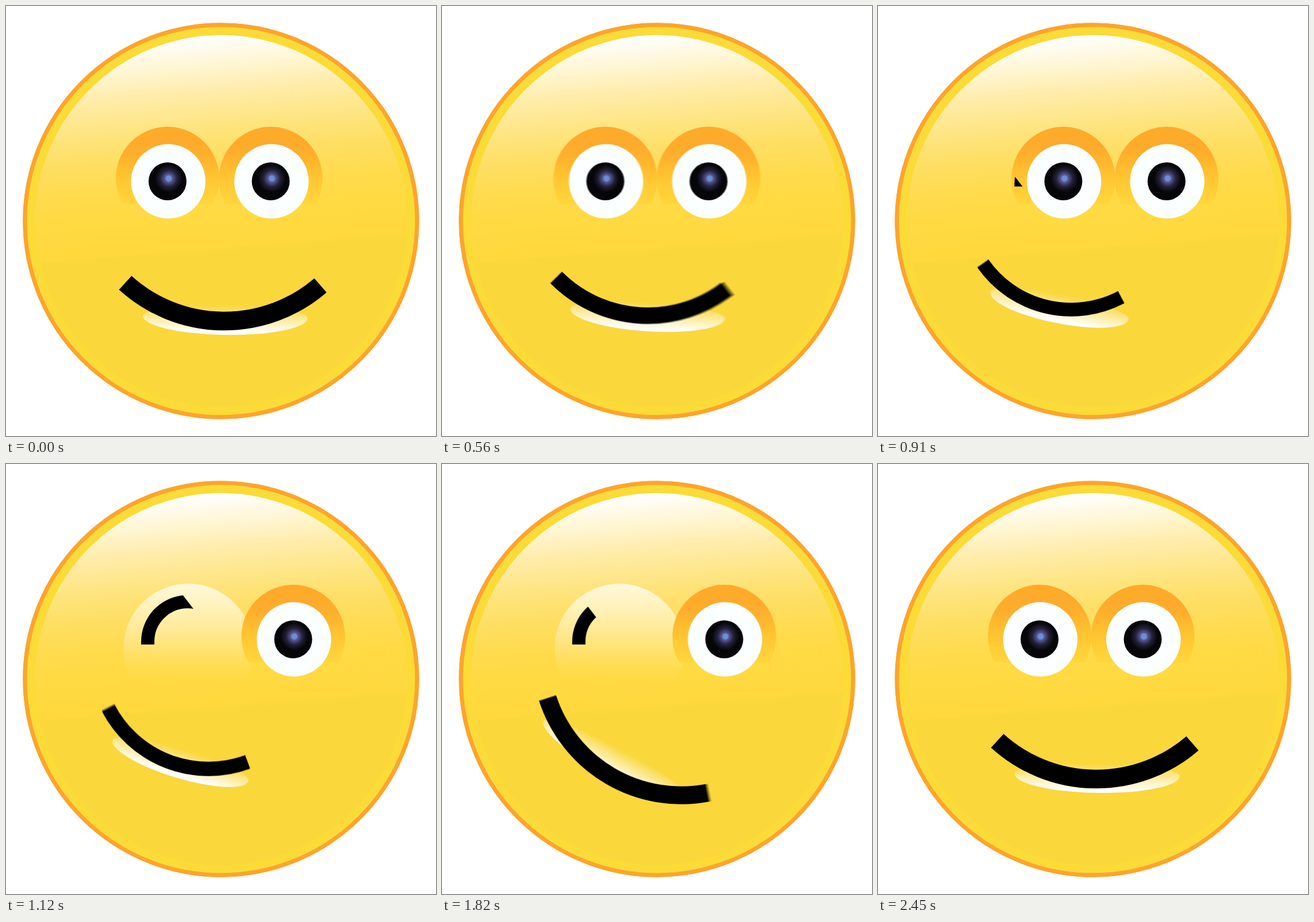
Write an HTML page that moves like this. It is 748x748 px and loops after 2.73 s.

```html
<!DOCTYPE html>
<html lang="en">
<head>
<meta charset="utf-8">
<title>Winking face</title>
<style>
  html, body { margin: 0; width: 100%; height: 100%; overflow: hidden; background: #fff; }
  svg { display: block; width: 100vw; height: 100vh; }
</style>
</head>
<body>
<svg viewBox="0 0 748 748">
  <defs>
    <linearGradient id="skin" gradientUnits="userSpaceOnUse" x1="374" y1="51" x2="404" y2="430">
      <stop offset="0" stop-color="#fff"/>
      <stop offset=".13" stop-color="#fff6d3"/>
      <stop offset=".26" stop-color="#ffeca8"/>
      <stop offset=".4" stop-color="#fee582"/>
      <stop offset=".52" stop-color="#fedf66"/>
      <stop offset=".68" stop-color="#ffdb4d"/>
      <stop offset=".82" stop-color="#ffda41"/>
      <stop offset=".97" stop-color="#ffd83d"/>
      <stop offset=".97" stop-color="#fbd83b"/>
      <stop offset="1" stop-color="#fad73b"/>
    </linearGradient>
    <linearGradient id="halo" gradientUnits="userSpaceOnUse" x1="0" y1="210" x2="0" y2="345">
      <stop offset=".2" stop-color="#feaa2b"/>
      <stop offset=".36" stop-color="#feaf2c"/>
      <stop offset=".52" stop-color="#febb2e"/>
      <stop offset=".7" stop-color="#ffc833"/>
      <stop offset="1" stop-color="#ffd63b"/>
    </linearGradient>
    <linearGradient id="lid" gradientUnits="userSpaceOnUse" x1="0" y1="208" x2="0" y2="378">
      <stop offset="0" stop-color="#fff9dc"/>
      <stop offset=".3" stop-color="#fff0b2"/>
      <stop offset=".55" stop-color="#ffe788"/>
      <stop offset=".8" stop-color="#ffde58"/>
      <stop offset="1" stop-color="#ffda40"/>
    </linearGradient>
    <linearGradient id="shine" gradientUnits="userSpaceOnUse" x1="0" y1="-20" x2="0" y2="26">
      <stop offset="0" stop-color="#fff" stop-opacity="0"/>
      <stop offset="1" stop-color="#fff"/>
    </linearGradient>
    <radialGradient id="glint" gradientUnits="userSpaceOnUse" cx="283" cy="300" r="24">
      <stop offset="0" stop-color="#6b93da"/>
      <stop offset=".2" stop-color="#6a8bd2"/>
      <stop offset=".25" stop-color="#5d5d9c"/>
      <stop offset=".6" stop-color="#24223c"/>
      <stop offset="1" stop-color="#060609"/>
    </radialGradient>
    <clipPath id="wipe"><polygon id="wipeEdge"/></clipPath>
    <g id="face">
      <circle cx="374" cy="374" r="341" fill="#fbdb37" stroke="#fda42d" stroke-width="7"/>
      <circle cx="374" cy="374" r="323.5" fill="url(#skin)"/>
    </g>
    <g id="eye">
      <path d="M203 345A90 90 0 1 1 359 345Z" fill="url(#halo)"/>
      <circle cx="282.3" cy="305" r="64.7" fill="#fcffff"/>
      <circle cx="281" cy="305" r="33" fill="url(#glint)"/>
    </g>
    <path id="closed" d="M180.4 378A113 113 0 1 1 375.6 378Z" fill="url(#lid)"/>
    <path id="lash" d="M207.5 314V309A69.5 69.5 0 0 1 346.5 309V314" fill="none" stroke="#000" stroke-width="23"/>
  </defs>
  <g id="stage"></g>
</svg>
<script>
const STEP = 70, HOLD = 280, LOOP = 2730, SAMPLES = 10, SHUTTER = 0.5;
const LID_SHUT = 11, LID_OPEN = 25;

// Tips of the mouth and of the highlight below it: [x0, y0, x1, y1]
const rest = { mouth: [207.5, 481.5, 547, 486], shine: [238, 539, 525, 543] };
const poses = [
  { at: 1, ...rest },
  { at: 10, mouth: [182.5, 448, 423, 506.5], shine: [195, 497, 436, 545] },
  { at: 17, mouth: [174.5, 399.5, 419, 538], shine: [178, 460, 413, 565] },
  { at: 23, mouth: [183.5, 407, 462.5, 572], shine: [177, 447, 430, 582] },
  { at: 26, mouth: [214, 473, 540, 529], shine: [189, 480, 457, 588] },
  { at: 29, ...rest }
];

const clamp = (x, max = 1) => Math.min(max, Math.max(0, x));
const smooth = x => (x = clamp(x)) * x * (3 - 2 * x);

// Monotone cubic interpolation between the poses
function tips(part, k) {
  const last = poses.length - 1;
  k = Math.min(poses[last].at, Math.max(poses[0].at, k));
  const i = Math.max(0, poses.findIndex(pose => pose.at >= k) - 1);
  const span = poses[i + 1].at - poses[i].at;
  const u = (k - poses[i].at) / span, v = 1 - u;
  return poses[i][part].map((from, c) => {
    const to = poses[i + 1][part][c];
    const slope = j => (poses[j + 1][part][c] - poses[j][part][c]) / (poses[j + 1].at - poses[j].at);
    const tangent = j => {
      if (j === 0 || j === last) return 0;
      const a = slope(j - 1), b = slope(j);
      return a * b <= 0 ? 0 : 2 * a * b / (a + b);
    };
    return from + (to - from) * smooth(u) + span * u * v * (tangent(i) * v - tangent(i + 1) * u);
  });
}

// Quick glance to the right, slow drift, return
function glance(k) {
  const drift = 0.8 * clamp(k - 10, 13);
  return (41.5 * smooth((k - 4) / 6) - drift) * (1 - smooth((k - 22.5) / 6));
}

// One circular arc, scaled and turned to span its two tips
function mouth(k) {
  const [x0, y0, x1, y1] = tips('mouth', k);
  const chord = Math.hypot(x1 - x0, y1 - y0), r = chord * 0.755;
  return `<path d="M${x0} ${y0}A${r} ${r} 0 0 0 ${x1} ${y1}"
    fill="none" stroke="#000" stroke-width="${chord * 0.096}"/>`;
}

function shine(k) {
  const [x0, y0, x1, y1] = tips('shine', k);
  const r = Math.hypot(x1 - x0, y1 - y0) / 2;
  const angle = Math.atan2(y1 - y0, x1 - x0) * 180 / Math.PI;
  return `<path transform="translate(${(x0 + x1) / 2} ${(y0 + y1) / 2}) rotate(${angle})"
    d="M${-r} 0A${r} 20 0 0 1 ${r} 0A${r} 31 0 0 1 ${-r} 0Z" fill="url(#shine)"/>`;
}

function scene(k, step) {
  const shut = step >= LID_SHUT && step < LID_OPEN;
  const lash = step > 9 && step < LID_OPEN ? '<g clip-path="url(#wipe)"><use href="#lash"/></g>' : '';
  return `<use href="#face"/>
    <g transform="translate(${glance(k)})">
      <use href="#${shut ? 'closed' : 'eye'}"/>
      <use href="#eye" x="179.5"/>${lash}
    </g>${shine(k)}${mouth(k)}`;
}

const stage = document.getElementById('stage');
const wipeEdge = document.getElementById('wipeEdge');

function draw(step) {
  const edge = -59 + 243 * (smooth((step - 9) / 6) - smooth((step - 20) / 5.4));
  const at = y => (edge + y) / 1.3;
  wipeEdge.setAttribute('points', `0,200 ${at(200)},200 ${at(330)},330 0,330`);

  // Motion blur: the n-th layer at opacity 1/n leaves an even average
  let layers = '';
  for (let i = 0; i < SAMPLES; i++) {
    const k = step + (i / (SAMPLES - 1) - 0.5) * SHUTTER;
    layers += `<g opacity="${1 / (i + 1)}">${scene(k, step)}</g>`;
  }
  stage.innerHTML = layers;
}

let shown = -1;
const start = performance.now();
function tick() {
  const t = (performance.now() - start) % LOOP;
  const step = t < HOLD ? 0 : Math.min(32, Math.floor((t - HOLD) / STEP) + 1);
  if (step !== shown) draw(shown = step);
  requestAnimationFrame(tick);
}
tick();
</script>
</body>
</html>
```
